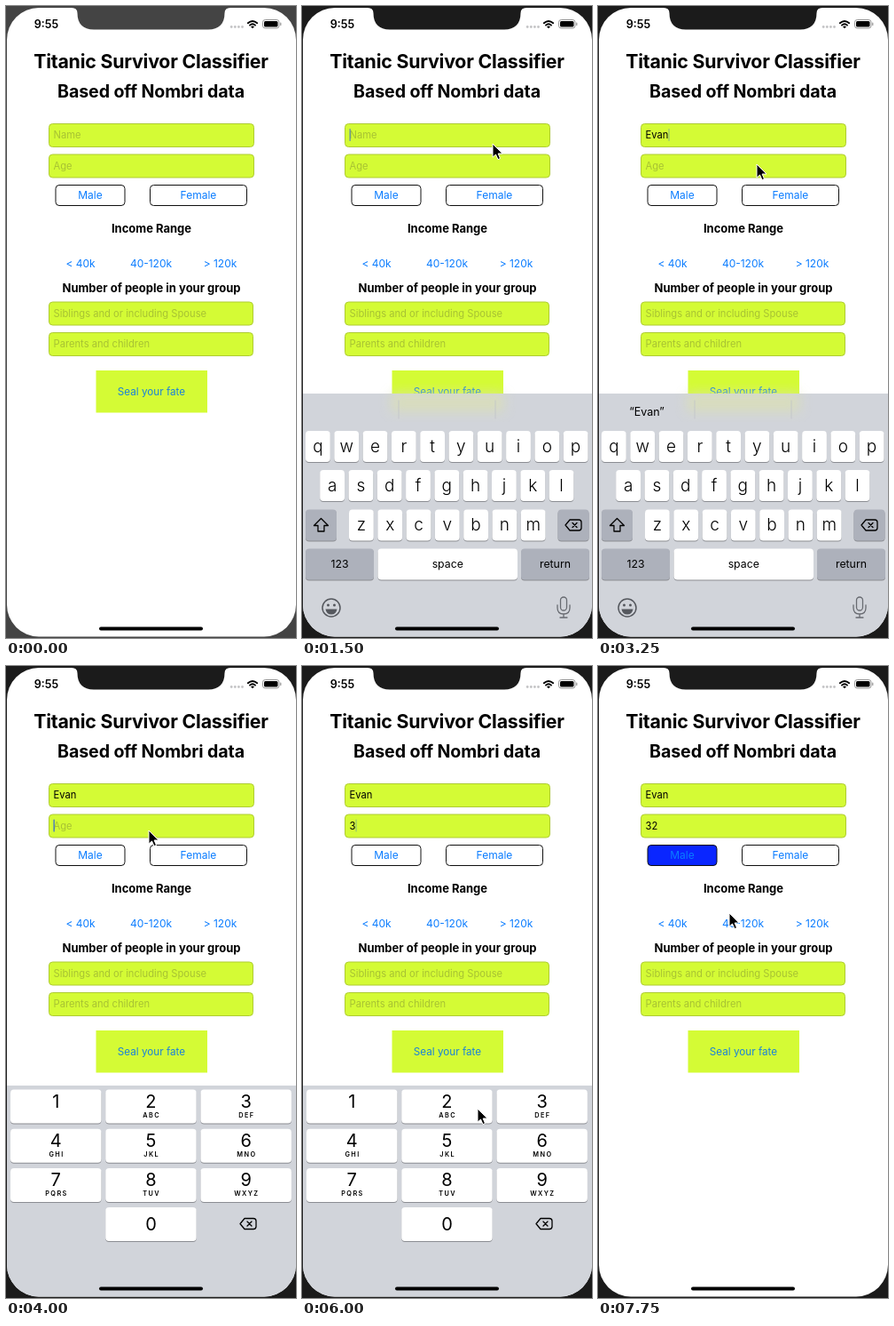
An HTML page for the animation above (8 s loop, 327 px wide and 711 px high).

```html
<!DOCTYPE html>
<html lang="en">
<head>
<meta charset="utf-8">
<title>Survivor form</title>
<style>
html, body { margin: 0; width: 100%; height: 100%; overflow: hidden; background: #1b1b1b; }
svg { display: block; width: 327px; height: 711px; font-family: Inter, "Open Sans", sans-serif; }
text { white-space: pre; }
</style>
</head>
<body>
<svg id="stage" viewBox="0 0 327 711">
  <defs>
    <clipPath id="screen"><rect x="1" y="2" width="326" height="707.5" rx="36"/></clipPath>
    <filter id="soft" x="-30%" y="-60%" width="160%" height="220%"><feGaussianBlur stdDeviation="7"/></filter>
  </defs>
</svg>
<script>
const NS = "http://www.w3.org/2000/svg";
const LOOP = 8000, STEP = 250;
const BLUE = "#0a7cff", LIME = "#d4fb35", EDGE = "#aecb33", HINT = "#a7c233", GREY = "#adb1bb";
const stage = document.getElementById("stage");

function el(tag, attrs, parent = stage) {
  const node = document.createElementNS(NS, tag);
  for (const k in attrs) node.setAttribute(k, attrs[k]);
  parent.appendChild(node);
  return node;
}
function box(x, y, w, h, r, fill, parent, extra = {}) {
  return el("rect", { x, y, width: w, height: h, rx: r, fill, ...extra }, parent);
}
function label(str, x, y, size, attrs = {}, parent = stage) {
  const node = el("text", { x, y, "font-size": size, "text-anchor": "middle", ...attrs }, parent);
  node.textContent = str;
  return node;
}
function line(d, parent, width = 1.4, color = "#000") {
  return el("path", { d, fill: "none", stroke: color, "stroke-width": width,
    "stroke-linecap": "round", "stroke-linejoin": "round" }, parent);
}
const show = (node, on) => node.setAttribute("visibility", on ? "visible" : "hidden");

// Phone frame and screen
const frame = box(0, 0, 327, 711, 0, "#1b1b1b");
const screen = el("g", { "clip-path": "url(#screen)" });
box(0, 0, 327, 711, 0, "#fff", screen);

// Form
const bold = { "font-weight": 700 };
label("Titanic Survivor Classifier", 163.5, 70, 21.3, { ...bold, "letter-spacing": -0.2 }, screen);
label("Based off Nombri data", 163.5, 103, 19.6, { ...bold, "letter-spacing": -0.1 }, screen);

function field(y, w, hint) {
  box(48.5, y, w, 26, 4, LIME, screen, { stroke: EDGE });
  const text = label("", 53.5, y + 16.5, 11.2, { "text-anchor": "start" }, screen);
  return value => {
    text.textContent = value || hint;
    text.setAttribute("fill", value ? "#000" : HINT);
    return value ? 54 + text.getComputedTextLength() : 54;
  };
}
const setName = field(132.5, 231, "Name");
const setAge = field(167, 231, "Age");
field(333, 230, "Siblings and or including Spouse")("");
field(367.5, 230, "Parents and children")("");
const caret = box(53.5, 138, 1.3, 14, 0.6, "#3467d6", screen);

function choice(x, w, str) {
  const rect = box(x, 201.5, w, 23, 4, "#fff", screen, { stroke: "#111" });
  label(str, x + w / 2, 217.3, 12, { fill: BLUE }, screen);
  return rect;
}
const male = choice(56, 78, "Male");
choice(162.5, 109, "Female");
label("Income Range", 164, 255, 13, bold, screen);
[["< 40k", 84], ["40-120k", 163.5], ["> 120k", 241.5]].forEach(([s, x]) =>
  label(s, x, 293.5, 12, { fill: BLUE }, screen));
label("Number of people in your group", 164, 321.5, 13, bold, screen);
box(101.5, 410, 125.5, 47.5, 0, LIME, screen);
label("Seal your fate", 164, 438, 11.7, { fill: "#1a82d8" }, screen);

// Keyboards
function key(x, y, w, h, fill, parent) {
  box(x, y + 1, w, h, 4, "#8b8d92", parent);
  return box(x, y, w, h, 4, fill, parent);
}
function eraser(x, y, parent) {
  line(`M${x - 9} ${y}l5-6h10q3 0 3 3v6q0 3-3 3h-10z`, parent, 1.3);
  line(`M${x - 1} ${y - 2.5}l5 5m0-5l-5 5`, parent, 1.3);
}

const letters = el("g", {}, screen);
box(0, 436, 327, 280, 0, "#d1d4da", letters);
box(101, 436, 126, 20, 0, "#dbe0b4", letters, { filter: "url(#soft)", opacity: 0.8 });
line("M109 444v20M218 444v20", letters, 0.8, "#c1c4ca");
const guess = label("", 55, 461, 12.5, {}, letters);
[["qwertyuiop", 4, 478], ["asdfghjkl", 20.2, 522], ["zxcvbnm", 53, 566.5]].forEach(([row, x0, y]) =>
  [...row].forEach((c, i) => {
    const x = x0 + i * 32.3;
    key(x, y, 27.8, 35, "#fff", letters);
    label(c, x + 13.9, y + 23.5, 19, { "font-weight": 300 }, letters);
  }));
key(4, 566.5, 35, 35, GREY, letters);
line("M21.5 576.5l-8 8h4.500v6.500h7v-6.500h4.500z", letters, 1.3);
key(288.500, 566.5, 35, 35, GREY, letters);
eraser(306, 584, letters);
[["123", 4, 77, GREY], ["space", 85.5, 157.5, "#fff"], ["return", 247, 77, GREY]].forEach(([s, x, w, fill]) => {
  key(x, 610.5, w, 35, fill, letters);
  label(s, x + w / 2, 632, 12.3, {}, letters);
});
el("circle", { cx: 33, cy: 677, r: 10, fill: "none", stroke: "#55585e", "stroke-width": 1.5 }, letters);
el("circle", { cx: 29.5, cy: 674, r: 1.5, fill: "#55585e" }, letters);
el("circle", { cx: 36.5, cy: 674, r: 1.5, fill: "#55585e" }, letters);
el("path", { d: "M26.500 678.500h13q-1 6-6.500 6t-6.500-6z", fill: "#55585e" }, letters);
box(291.500, 665, 7, 15, 3.5, "none", letters, { stroke: "#686b71", "stroke-width": 1.3 });
line("M288 674v3q0 7 7 7t7-7v-3M295 684v4M291 688h8", letters, 1.3, "#686b71");

const digits = el("g", {}, screen);
box(0, 472, 327, 244, 0, "#d1d4da", digits);
const pads = {};
["", "ABC", "DEF", "GHI", "JKL", "MNO", "PQRS", "TUV", "WXYZ"].forEach((sub, i) => {
  const x = 5 + (i % 3) * 107.2, y = 476.500 + Math.floor(i / 3) * 44.2;
  pads[i + 1] = key(x, y, 102.500, 38, "#fff", digits);
  label(i + 1, x + 51.200, y + 20.500, 20, {}, digits);
  label(sub, x + 52, y + 31.500, 7.3, { "font-weight": 600, "letter-spacing": 1.4 }, digits);
});
key(112.200, 609, 102.500, 38, "#fff", digits);
label("0", 163.500, 635, 20, {}, digits);
eraser(273, 627.5, digits);

// Notch, status bar, home bar
const notch = el("path", { d: "M74 0V2Q80.500 2 80.500 8C80.500 20 87 26.500 99 26.500H228C240 26.500 246.500 20 246.500 8Q246.500 2 253 2V0Z" });
label("9:55", 45.500, 25, 12.6, { "font-weight": 600 });
for (let i = 0; i < 4; i++) el("circle", { cx: 254.200 + i * 4.100, cy: 23.500, r: 1.4, fill: "#c4c4c6" });
line("M272.800 19.200q5.200-4.600 10.400 0M275 21.600q3-2.600 6 0", stage, 1.9);
el("path", { d: "M276 23.300q2-1.600 4 0l-2 2z" });
box(289.500, 15.500, 18.500, 9.500, 2.8, "none", stage, { stroke: "#8c8c8c", "stroke-width": 0.9 });
box(291, 17, 15.500, 6.500, 1.5, "#000");
line("M309.800 19v2.500", stage, 1.1, "#8c8c8c");
box(105, 698.500, 117, 4, 2, "#000");

const mouse = el("path", { d: "M0 0V15.200L3.500 12L6 17.600L8.500 16.500L6.100 11H11Z",
  fill: "#000", stroke: "#fff", "stroke-width": 1, "stroke-linejoin": "round" });

// Pointer stops: step, x, y
const path = [[1, 300, 70], [3, 215, 155], [11, 215, 155], [13, 179, 178], [15, 161, 185], [17, 161, 185],
  [18, 205, 310], [19, 262, 620], [20, 316, 408], [22, 270, 494], [24, 198, 498], [25, 168, 494],
  [26, 165, 494], [28, 92, 208], [29, 92, 210], [31, 148, 278]];
function pointer(s) {
  const i = path.findIndex(p => p[0] >= s);
  if (i < 1) return path[0].slice(1);
  const [s0, x0, y0] = path[i - 1], [s1, x1, y1] = path[i];
  const k = (s - s0) / (s1 - s0);
  return [x0 + (x1 - x0) * k, y0 + (y1 - y0) * k];
}

// The screen changes in hard quarter-second steps.
function draw(time) {
  const s = Math.floor((time % LOOP) / STEP);
  const tone = s < 1 ? "#444" : "#1b1b1b";
  frame.setAttribute("fill", tone);
  notch.setAttribute("fill", tone);

  const typed = [7, 8, 10, 11].filter(n => s >= n).length;
  const name = "Evan".slice(0, typed);
  const age = s >= 25 ? "32" : s >= 22 ? "3" : "";
  const nameEnd = setName(name), ageEnd = setAge(age);
  guess.textContent = name && `\u201c${name}\u201d`;

  const onAge = s >= 16;
  show(caret, s >= 4 && s < 29);
  caret.setAttribute("x", (onAge ? ageEnd : nameEnd) - 0.5);
  caret.setAttribute("y", onAge ? 172.5 : 138);
  caret.setAttribute("opacity", s === 4 || s === 16 ? 0.95 : s % 4 === 1 || s === 24 ? 0.35 : 0.7);

  show(letters, s >= 4 && s < 16);
  letters.setAttribute("transform", `translate(0 ${s === 4 ? 155.5 : s === 5 ? 12 : 0})`);
  show(digits, onAge && s < 30);
  digits.setAttribute("transform", `translate(0 ${s === 29 ? 120 : 0})`);
  pads[3].setAttribute("fill", s === 22 ? GREY : "#fff");
  pads[2].setAttribute("fill", s === 25 ? GREY : "#fff");
  male.setAttribute("fill", s >= 29 ? "#0a26ff" : "#fff");

  show(mouse, s >= 1);
  mouse.setAttribute("transform", `translate(${pointer(s)})`);
}

const start = performance.now();
function tick() {
  draw(performance.now() - start);
  requestAnimationFrame(tick);
}
draw(0);
tick();
</script>
</body>
</html>
```
